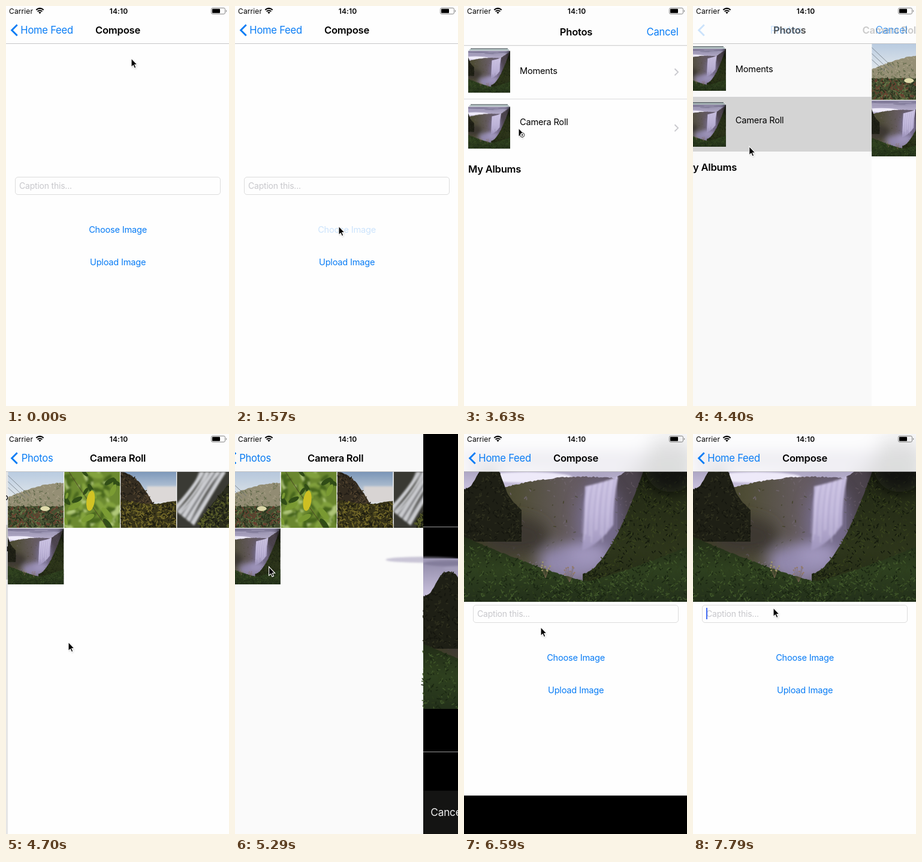
Write an HTML page that moves like this. It is 372x665 px and loops after 8 s.

```html
<!DOCTYPE html>
<html lang="en">
<head>
<meta charset="utf-8">
<title>Compose a photo post</title>
<style>
  html, body { margin: 0; width: 100%; height: 100%; overflow: hidden; background: #fefefe; }
  svg { display: block; }
  text { font-family: Inter, Roboto, "Liberation Sans", sans-serif; letter-spacing: -.015em; white-space: pre; }
  .nav { font-size: 16.6px; }
  .bar { font-size: 17.3px; fill: #ededed; }
  .bold { font-weight: 600; }
  .body { font-size: 14.6px; }
  .status { font-size: 12px; letter-spacing: .01em; }
  .blue { fill: #087cf5; }
  .mid { text-anchor: middle; }
  .end { text-anchor: end; }
</style>
</head>
<body>
<script>
const W = 372, H = 665, LOOP = 8000, BAR = 62, CELL = 94;

let seed = 7;
const rnd = () => (seed = (seed * 16807) % 2147483647) / 2147483647;
const between = (a, b) => a + (b - a) * rnd();
const clamp = v => Math.min(1, Math.max(0, v));
const repeat = (n, make) => Array.from({ length: n }, (_, i) => make(i)).join('');

const path = (d, fill, extra = '') => `<path d="${d}" fill="${fill}" ${extra}/>`;
const rect = (x, y, w, h, fill, extra = '') => `<rect x="${x}" y="${y}" width="${w}" height="${h}" fill="${fill}" ${extra}/>`;
const oval = (x, y, rx, ry, fill, extra = '') => `<ellipse cx="${x}" cy="${y}" rx="${rx}" ry="${ry}" fill="${fill}" ${extra}/>`;
const text = (x, y, label, cls, extra = '') => `<text x="${x}" y="${y}" class="${cls}" ${extra}>${label}</text>`;
const blur = (name, art) => `<g filter="url(#${name})">${art}</g>`;

// Evenly spaced colour stops, running down or across.
function gradient(id, across, ...colors) {
  const stops = colors.map((c, i) => `<stop offset="${i / (colors.length - 1)}" stop-color="${c}"/>`).join('');
  return `<linearGradient id="${id}" x2="${across ? 1 : 0}" y2="${across ? 0 : 1}">${stops}</linearGradient>`;
}

// Ground below the curve top(x), with a rough edge and short strokes in each tone.
function land(top, from, to, bottom, fill, tones, count, len = 4) {
  let edge = `M${from} ${bottom}`;
  for (let x = from; x <= to; x += 3) edge += `L${x} ${(top(x) + between(-1, 1)).toFixed(1)}`;
  const grain = tones.map(tone => {
    const d = repeat(count, () => {
      const x = between(from, to), y = between(top(x) + len * .6, bottom);
      return `M${x.toFixed(1)} ${y.toFixed(1)}l${between(-len, len).toFixed(1)} ${between(-len, 0).toFixed(1)}`;
    });
    return path(d, 'none', `stroke="${tone}" stroke-width="${len * .4}" stroke-linecap="round"`);
  });
  return path(`${edge}L${to} ${bottom}Z`, fill) + grain.join('');
}

// Waterfall scene, 372 by 250.
const ruinTop = x => 22 + 40 * (1 - Math.exp(-((Math.abs(x - 42) / 24) ** 3))) + Math.max(0, x - 60);
const plateauTop = x => 42 + 20 * ((x - 200) / 140) ** 2;
const shoulderTop = x => 42 - (x - 256) * .66;
const cliffTop = x => 203 * (1 - clamp((x - 198) / 112) ** 1.7);
const bankTop = x => 216 - 74 * Math.abs(1 - x / 205) ** 1.2;

const clouds = repeat(9, i => oval(i * 42, between(2, 22), between(35, 65), 5, i % 2 ? '#77718f' : '#a9a2bf', 'opacity=".6"'))
  + oval(105, 43, 75, 9, '#eeeaf9');

const fallStreaks = repeat(16, i => {
  const x = 205 + i * 3.1;
  return path(`M${x} ${58 - i}Q${x - 7} ${between(70, 95)} ${x - 8} ${between(120, 155)}`, 'none',
    `stroke="${i % 3 ? '#d8d0ec' : '#aaa0c8'}" stroke-width="1.6" opacity=".55"`);
});

const flowers = (x, y, tint) => repeat(9, () => {
  const dx = between(-9, 9), dy = between(-12, 4);
  return path(`M${x} ${y + 14}L${x + dx} ${y + dy}`, 'none', 'stroke="#6f5f4a" stroke-width=".5"') + oval(x + dx, y + dy, 1.5, 1.2, tint);
});

const falls = `<g id="falls">
  ${rect(0, 0, W, 250, 'url(#sky)')}${blur('soft', clouds)}
  ${land(plateauTop, 0, 270, 225, 'url(#plateau)', ['#46442f', '#6d6369'], 110)}
  ${land(shoulderTop, 256, 312, 130, '#4b434c', ['#5c525b'], 40)}
  ${blur('mist', oval(85, 140, 55, 32, '#3c3932') + oval(225, 120, 38, 70, '#7d739a', 'opacity=".75"') + oval(180, 185, 55, 32, '#9389ae'))}
  ${blur('soft', path('M202 58Q236 51 257 42Q249 80 249 122Q225 155 197 165Q201 110 202 58Z', 'url(#water)') + fallStreaks)}
  ${blur('mist', oval(208, 172, 35, 15, '#a298bf'))}
  ${land(ruinTop, 0, 96, 150, '#1e1f15', ['#2e2f1e', '#14150e'], 130)}
  ${land(cliffTop, 198, W, 250, 'url(#cliff)', ['#38431d', '#141a0d', '#2d3618'], 330)}
  ${blur('mist', oval(345, 20, 45, 48, '#0e110b', 'opacity=".8"'))}
  ${land(bankTop, 0, W, 250, 'url(#bank)', ['#1a2612', '#40572a', '#2d3d1c'], 330)}
  ${flowers(176, 203, '#92796a')}${flowers(136, 196, '#a39b6c')}
</g>`;

const squareFalls = (x, y, size) =>
  `<svg x="${x}" y="${y}" width="${size}" height="${size}" viewBox="61 0 250 250"><use href="#falls"/></svg>`;

const duneTop = x => 42 - 24 * Math.sin(x / 60);
const beach = () => rect(0, 0, 93, 93, 'url(#beachSky)')
  + land(duneTop, 0, 93, 93, '#958f75', ['#767b59', '#aaa388', '#60694a'], 90, 3)
  + land(x => 57, 0, 93, 93, '#465031', ['#687648', '#6d3e30', '#29331e'], 110)
  + repeat(3, i => path(`M0 ${6 + i * 10}L${36 - i * 7} ${40 + i * 3}`, 'none', 'stroke="#626b73" stroke-width=".7"'))
  + oval(62, 61, 8, 4, '#dfdbab');

const leaf = (x, y, size, tint, turn) => oval(0, 0, size * .4, size, tint, `transform="translate(${x} ${y}) rotate(${turn})"`);
const foliage = (n, tint) => repeat(n, () => leaf(between(0, 93), between(0, 93), between(5, 13), tint, between(-80, 80)));
const leaves = () => rect(0, 0, 93, 93, '#6c8a30')
  + blur('soft', foliage(22, '#b0c878') + foliage(30, '#48671f') + foliage(18, '#83a33d'))
  + foliage(9, '#314e17') + foliage(7, '#7b9c33')
  + path('M8 0Q28 32 72 93', 'none', 'stroke="#4c4924"') + leaf(44, 48, 17, '#d2c324', 8);

const cove = () => rect(0, 0, 93, 93, 'url(#coveSky)')
  + blur('soft', rect(44, 24, 55, 27, '#dcd8d7'))
  + land(x => x * x / 55, 0, 54, 60, '#352d21', ['#54452f', '#211d16'], 70)
  + land(x => 46 + 7 * Math.sin(x / 32), 0, 93, 93, '#383419', ['#5e5721', '#1b1a0f', '#776c2a'], 110);

const stream = () => rect(0, 0, 93, 93, '#3a3a34')
  + blur('soft', repeat(15, i => path(`M${38 + i * 3} 0Q${28 + i * 2} ${between(20, 40)} ${i * 2.5 - 8} ${60 + i * 2}`, 'none',
      `stroke="${i % 3 ? '#cfd0d4' : '#7f8083'}" stroke-width="3.5"`)))
  + land(x => 80 - (x - 38) * 1.25, 38, 93, 93, '#2b2d1d', ['#4c5125', '#171911', '#5d622b'], 75);

const thumbs = [beach, leaves, cove, stream].map((art, i) =>
  `<svg x="${i * CELL}" y="63" width="93" height="93" viewBox="0 0 93 93">${art()}</svg>`).join('');

const defs = `<defs>
  ${gradient('sky', false, '#8c86a4', '#cac2de', '#ccc4df', '#a198b8', '#8b82a2')}
  ${gradient('plateau', true, '#383920', '#4f4d36', '#655b60', '#60566a')}
  ${gradient('water', false, '#cbc2e2', '#bbb1d6', '#a096bd')}
  ${gradient('cliff', false, '#171a10', '#262d17', '#2d351b', '#1d2413')}
  ${gradient('bank', false, '#222c17', '#2e401f', '#23301a')}
  ${gradient('beachSky', false, '#b9cbe0', '#e4e9ec', '#dfe0d8')}
  ${gradient('coveSky', false, '#7d98ba', '#dce3ea', '#dce3ea')}
  <filter id="soft"><feGaussianBlur stdDeviation="1.4"/></filter>
  <filter id="mist" x="-50%" y="-50%" width="200%" height="200%"><feGaussianBlur stdDeviation="11"/></filter>
  <clipPath id="barClip"><rect width="${W}" height="${BAR}"/></clipPath>
  <clipPath id="photoClip"><rect y="${BAR}" width="${W}" height="217"/></clipPath>
  ${falls}
</defs>`;

const angle = (x, y, w, color, weight) => path(`M${x} ${y - w}l${w} ${w}l${-w} ${w}`, 'none', `stroke="${color}" stroke-width="${weight}"`);
const back = `<g transform="translate(27.7) scale(-1 1)">${angle(9, 40.2, 9, '#087cf5', 2.9)}</g>`;
const rule = (y, color = '#b9b9bb') => rect(0, y, W, .8, color);

const compose = `<g id="compose">
  ${rect(0, 0, W, H, '#fefefe')}
  <g id="chosen">
    <g clip-path="url(#photoClip)"><use href="#falls" y="29"/></g>
    <g clip-path="url(#barClip)">${blur('mist', '<use href="#falls" y="29"/>')}${rect(0, 0, W, BAR, '#fcfcfd', 'opacity=".87"')}</g>
  </g>
  ${rule(BAR)}${back}
  ${text(24.3, 46, 'Home Feed', 'nav blue')}
  ${text(186.5, 46, 'Compose', 'nav bold mid')}
  ${rect(15.5, 284.5, 342, 29, '#fefefe', 'rx="4.5" stroke="#dcdcdc"')}
  ${text(22, 304, 'Caption this...', '', 'font-size="14" fill="#c8c8cc"')}
  ${rect(22, 289, 2, 19, '#426bf2', 'id="caret"')}
  ${text(186.6, 376.5, 'Choose Image', 'body blue mid', 'id="chooseButton"')}
  ${text(186.6, 430.5, 'Upload Image', 'body blue mid')}
</g>`;

const album = (y, label) => rect(11, y - 4, 62, 1.2, '#3e4c52') + rect(9, y - 2, 66, 1.3, '#87a1a4')
  + squareFalls(7, y, 70) + text(93, y + 38.5 - (y > 100 ? 7.5 : 0), label, 'body') + angle(351.5, y + 35.5, 5.6, '#c7c7cc', 1.8);

const library = `<g id="library"><g id="libraryShift">
  ${rect(0, 0, W, H, '#fefefe')}
  <g id="albums">
    ${rect(0, 152, 500, 90, '#d9d9d9', 'id="rowPress"')}
    ${album(71, 'Moments')}${rule(151, '#cfcfd1')}${album(164, 'Camera Roll')}
    ${text(7, 273.5, 'My Albums', 'nav bold')}
  </g>
  ${rect(0, BAR, W, H, '#000', 'id="albumsDim"')}
  <g id="gallery">${rect(0, BAR, W, H, '#fefefe')}${thumbs}${squareFalls(0, 63 + CELL, 93)}</g>
  ${rect(0, 0, W, BAR, '#fdfdfd')}${rule(BAR)}
  <g id="albumsNav">${text(187, 46, 'Photos', 'nav bold mid', 'id="albumsTitle"')}${text(357.5, 46, 'Cancel', 'nav blue end')}</g>
  <g id="galleryNav">${back}${text(24.6, 46, 'Photos', 'nav blue', 'id="backLabel"')}${text(185, 46, 'Camera Roll', 'nav bold mid', 'id="galleryTitle"')}</g>
</g>${rect(0, 0, W, H, '#000', 'id="libraryDim"')}</g>`;

const wifi = repeat(2, i => path(`M${50.3 + i * 2.3} ${6.6 + i * 2.5}Q56.5 ${1.2 + i * 4.6} ${62.7 - i * 2.3} ${6.6 + i * 2.5}`, 'none', 'stroke="#000" stroke-width="2"'))
  + path('M54.2 10.6Q56.5 8.8 58.8 10.6L56.5 13Z', '#000');
const battery = rect(342.5, 3.3, 23, 10, 'none', 'rx="2.3" stroke="#777" stroke-width=".9"')
  + rect(344, 4.8, 13, 7, '#000', 'rx=".8"') + path('M367 6.5Q369.6 8.3 367 10.1Z', '#777');
const statusBar = text(5, 12.5, 'Carrier', 'status') + text(188, 12.5, '14:10', 'status bold mid') + wifi + battery;

const crop = `<g id="crop">
  ${rect(0, 0, W, H, '#000')}<use href="#falls" y="207"/>
  ${rect(0, 154, W, 1, '#999')}${rect(0, 528, W, 1, '#999')}
  ${rect(0, 593, W, 72, '#141413')}
  ${text(12.3, 635, 'Cancel', 'bar')}${text(362.5, 635, 'Choose', 'bar end')}
</g>`;

const ARROW = 'M0 0V14.6L3.3 11.6 5.5 16.6 7.9 15.5 5.8 10.6H10.1Z';
const pointer = `<g id="pointer">
  ${path(ARROW, '#000', 'opacity=".22" filter="url(#soft)" transform="translate(.7 1.4)"')}
  ${path(ARROW, '#000', 'stroke="#fff" stroke-width="1.1"')}
  <g id="ring">${oval(6.2, 11.4, 3.6, 3.6, '#fff', 'stroke="#333"')}${oval(6.2, 11.4, 1.3, 1.3, '#333')}</g>
</g>`;

document.body.innerHTML = `<svg width="${W}" height="${H}" viewBox="0 0 ${W} ${H}">
  ${defs}${compose}${library}${statusBar}${crop}${pointer}</svg>`;

const el = {};
document.querySelectorAll('svg [id]').forEach(node => el[node.id] = node);
const move = (node, x, y = 0) => node.setAttribute('transform', `translate(${x.toFixed(2)} ${y.toFixed(2)})`);
const fade = (node, a) => node.setAttribute('opacity', a);
const show = (node, on) => node.setAttribute('display', on ? 'inline' : 'none');

// Critically damped spring: the share of the distance still to travel.
function remaining(t, start) {
  const u = Math.max(0, t - start) / 50;
  const r = (1 + u) * Math.exp(-u);
  return r < .0008 ? 0 : r;
}

// Each glide eases the pointer to a place between two times; rise bows its path upwards.
const HOME = { x: 209, y: 87 };
const glides = [];
const glide = (from, to, x, y, rise = 0) => glides.push({ from, to, x, y, rise });
glide(60, 330, 180, 125, 18);
glide(510, 650, 174, 342);
glide(880, 1480, 173, 366, 84);
glide(1920, 2700, 70, 238, 45);
glide(2730, 2840, 45, 180);
glide(2990, 3630, 91, 203);
glide(4300, 4640, 104, 346);
glide(4700, 4960, 50, 212);
glide(5260, 5580, 300, 543);
glide(5600, 5900, 332, 622);
glide(6410, 6590, 128, 321);
glide(6700, 7150, 154, 321);
glide(7220, 7310, 134, 289);

function pointerAt(t) {
  let { x, y } = HOME;
  for (const g of glides) {
    const k = clamp((t - g.from) / (g.to - g.from)), e = k * k * (3 - 2 * k);
    x += (g.x - x) * e;
    y += (g.y - y) * e - g.rise * Math.sin(Math.PI * k);
  }
  return [x, y];
}

const PRESENT = 3260, PUSH_GALLERY = 4360, PUSH_CROP = 5256, DISMISS = 6394;

function render(t) {
  const sheetY = H * (t < DISMISS ? remaining(t, PRESENT) : 1 - remaining(t, DISMISS));
  const left = remaining(t, PUSH_GALLERY), cropLeft = remaining(t, PUSH_CROP);
  const inGallery = 1 - left, inCrop = 1 - cropLeft;

  show(el.chosen, t > PUSH_CROP + 600);
  show(el.caret, t >= 7790);
  fade(el.chooseButton, t < 1540 ? 1 : .2 + .8 * clamp((t - 1910) / 200));

  show(el.library, sheetY < H);
  move(el.library, 0, sheetY);
  move(el.libraryShift, -.3 * W * inCrop);
  fade(el.libraryDim, .1 * inCrop);
  show(el.rowPress, t >= 4200);
  move(el.albums, -.3 * W * inGallery);
  fade(el.albumsDim, .1 * inGallery);
  move(el.gallery, W * left);
  fade(el.albumsNav, clamp(1 - inGallery * 1.6));
  move(el.albumsTitle, -130 * inGallery);
  fade(el.galleryNav, inGallery);
  move(el.backLabel, 130 * left);
  move(el.galleryTitle, 180 * left);

  show(el.crop, t >= PUSH_CROP && sheetY < H);
  move(el.crop, W * cropLeft, sheetY);

  move(el.pointer, ...pointerAt(t));
  show(el.ring, t >= 3590 && t < 3690);
}

const begin = performance.now();
function tick() {
  render((performance.now() - begin) % LOOP);
  requestAnimationFrame(tick);
}
tick();
</script>
</body>
</html>
```
